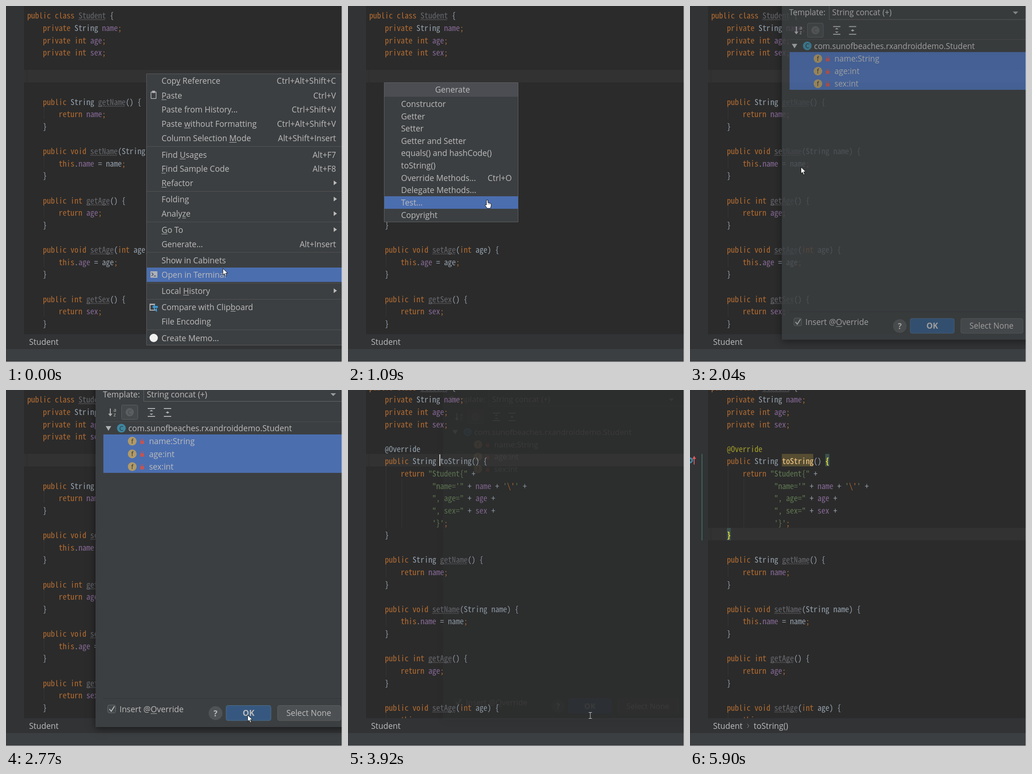
Recreate the animation shown at these times as an HTML page with a canvas. Size 728 by 769 pixels, loop 6280 ms.

```html
<!DOCTYPE html>
<html lang="en">
<head>
<meta charset="utf-8">
<title>Generating toString()</title>
<style>
html, body { margin: 0; width: 100%; height: 100%; overflow: hidden; background: #2b2b2b; }
canvas { display: block; }
</style>
</head>
<body>
<canvas id="stage" width="728" height="769"></canvas>
<script>
const W = 728, H = 769, LOOP = 6280;
const stage = document.getElementById('stage').getContext('2d');
const buffer = Object.assign(document.createElement('canvas'), { width: W, height: H }).getContext('2d');
let g = stage;

const UI = '17.5px "Open Sans", "Noto Sans", sans-serif';
const MONO = '"Noto Sans Mono CJK SC", "Noto Sans Mono CJK JP", "Liberation Mono", monospace';
const PANEL = '#3c3f41', TEXT = '#bbbbbb', SELECT = '#4b6eaf';
const COL = 8.53, ROW = 26.62, TOP = 5, LEFT = 46;

// Choose the code size whose advance equals one column.
g.font = '100px ' + MONO;
const CODE = (100 * COL / g.measureText('0').width).toFixed(2) + 'px ' + MONO;

// ---------- drawing helpers ----------
function box(x, y, w, h, fill, stroke, r = 0) {
  g.beginPath();
  g.roundRect(x, y, w, h, r);
  if (fill) { g.fillStyle = fill; g.fill(); }
  if (stroke) { g.strokeStyle = stroke; g.lineWidth = 1; g.stroke(); }
}

function poly(points, fill, stroke, width = 1) {
  g.beginPath();
  points.forEach(([x, y]) => g.lineTo(x, y));
  if (fill) { g.closePath(); g.fillStyle = fill; g.fill(); }
  if (stroke) { g.strokeStyle = stroke; g.lineWidth = width; g.stroke(); }
}

function disc(x, y, r, fill) {
  g.beginPath();
  g.arc(x, y, r, 0, 7);
  g.fillStyle = fill;
  g.fill();
}

function text(s, x, y, { color = TEXT, align = 'left', font = UI } = {}) {
  g.font = font;
  g.fillStyle = color;
  g.textAlign = align;
  g.fillText(s, x, y);
}

// "&" marks the underlined letter.
function label(s, x, mid) {
  const at = s.indexOf('&'), plain = s.replace('&', '');
  text(plain, x, mid + 6.5);
  if (at < 0) return;
  const start = x + g.measureText(plain.slice(0, at)).width;
  box(start, mid + 9, g.measureText(plain[at]).width, 1, TEXT);
}

// Draws a group at once with opacity and scale about the dialog's centre.
function layer(draw, alpha = 1, scale = 1) {
  if (alpha === 1) return draw();
  buffer.clearRect(0, 0, W, H);
  g = buffer;
  g.save();
  g.translate(488, 300);
  g.scale(scale, scale);
  g.translate(-488, -300);
  draw();
  g.restore();
  g = stage;
  g.globalAlpha = alpha;
  g.drawImage(buffer.canvas, 0, 0);
  g.globalAlpha = 1;
}

// ---------- editor ----------
// "_" marks a field, "~" an unused symbol.
const accessors = (name, type, setter = true) => {
  const cap = name[0].toUpperCase() + name.slice(1);
  const out = ['', `    public ${type} ~get${cap}() {`, `        return _${name};`, '    }'];
  if (setter) out.push('', `    public void ~set${cap}(${type} ${name}) {`, `        this._${name} = ${name};`, '    }');
  return out;
};
const fields = ['public class ~Student {', '    private String _name;', '    private int _age;', '    private int _sex;'];
const methods = [...accessors('name', 'String'), ...accessors('age', 'int'), ...accessors('sex', 'int', false)];
const before = [...fields, '', '', ...methods];
const pad = ' '.repeat(16);
const after = [...fields, '', '    @Override', '    public String toString() {',
  '        return "Student{" +',
  pad + `"name='" + _name + '\\'' +`,
  pad + '", age=" + _age +',
  pad + '", sex=" + _sex +',
  pad + `'}';`, '    }', ...methods];

const TOKEN = /(\b(?:public|class|private|int|void|return|this)\b|;|\\')|_(\w+)|~(\w+)|("[^"]*"|'}'|')|(@\w+)|([^\s\w]|\w+)|\s+/g;

const rowY = row => TOP + row * ROW;
const baseline = row => Math.round(rowY(row) + 22.3);

// Slight transparency keeps the strokes as light as a thin screen font.
function code(s, col, row, color, weight = '') {
  g.globalAlpha = 0.85;
  text(s, LEFT + col * COL, baseline(row), { color, font: weight + CODE });
  g.globalAlpha = 1;
}

function wave(x, y, w) {
  const pts = [];
  for (let i = 0; i <= w; i += 2) pts.push([x + i, y + (i % 4 ? 0 : 2)]);
  poly(pts, null, '#72737a', 0.9);
}

function codeLine(line, row, lit) {
  let col = 0;
  for (const [all, key, field, unused, str, note, plain] of line.matchAll(TOKEN)) {
    const word = key || field || unused || str || note || plain;
    const color = key ? '#cc7832' : field ? '#9876aa' : unused ? '#72737a' : str ? '#6a8759'
      : note && lit ? '#bbb529' : '#a9b7c6';
    if (word) code(word, col, row, color);
    if (unused) wave(LEFT + col * COL, baseline(row) + 1.5, word.length * COL);
    col += (word || all).length;
  }
}

function editor({ lines, first, caretRow, lit, done, marked, caret }) {
  box(0, 0, W, H, '#2b2b2b');
  box(0, 0, 39, H, '#313335');
  g.save();
  g.beginPath();
  g.rect(0, 0, W, 709);
  g.clip();
  box(39, rowY(caretRow), W - 39, ROW + 0.4, '#323232');
  box(45, rowY(caretRow), 1, ROW, '#2b2b2b');
  lines.forEach((line, i) => {
    if (line.startsWith('        ')) box(82, rowY(i - first), 1, ROW, '#363636');
    if (line.startsWith(pad)) box(116, rowY(i - first), 1, ROW, '#363636');
  });
  if (marked) box(199, 138, 68, 27, '#564d32');
  if (done) {
    box(293, 138, 9, 27, '#3b514d');
    box(80, 298, 8.5, 27, '#3b514d');
    box(25, 138, 2, 187, '#42645a');
  }
  lines.forEach((line, i) => codeLine(line, i - first, lit));
  if (marked) code('toString', 18, 5, '#ffc66d');
  if (done) {
    code('{', 29, 5, '#ffef28', 'bold ');
    code('}', 4, 11, '#ffef28', 'bold ');
  }
  if (lit) {
    disc(0, 152, 6.5, '#3e86a0');
    disc(0, 152, 2.8, '#313335');
    poly([[9, 161], [9, 144]], null, '#db5860', 2);
    poly([[5, 149], [9, 142], [13, 149]], '#db5860');
  }
  if (caret) box(caret[0], rowY(caret[1]) + 1, 2, 25, '#d0d0d0');
  g.restore();

  box(0, 709, W, 32, '#313335');
  box(0, 741, W, 28, PANEL);
  text('Student', 50, 732);
  if (lit) {
    poly([[124, 721], [127.5, 725.5], [124, 730]], null, '#777777', 1.2);
    text('toString()', 138, 732);
  }
}

function edges() {
  box(W - 1, 0, 1, H, 'rgba(255,255,255,.6)');
  box(0, H - 1, W, 1, 'rgba(255,255,255,.6)');
}

// ---------- context menu ----------
const MENU = [
  [161, 'Cop&y Reference', 'Ctrl+Alt+Shift+C'], [193, '&Paste', 'Ctrl+V'],
  [223.5, 'Paste from History...', 'Ctrl+Shift+V'], [254, 'Paste &without Formatting', 'Ctrl+Alt+Shift+V'],
  [285, 'Column Selection &Mode', 'Alt+Shift+Insert'], [303],
  [321, 'Find &Usages', 'Alt+F7'], [351.5, '&Find Sample Code', 'Alt+F8'], [382, '&Refactor', '>'], [400],
  [417, 'Folding', '>'], [448.5, 'Analy&ze', '>'], [466],
  [483, '&Go To', '>'], [514, 'Generate...', 'Alt+Insert'], [531.5],
  [549, 'Show in Cabinets'], [580.5, 'Open in Terminal'], [598],
  [615, 'Local &History', '>'], [633],
  [650, 'Compare with Clip&board'], [681, 'File Encoding'], [699],
  [717, 'Create Memo...']
];

function menuIcons() {
  box(314, 185.5, 11.5, 14.5, null, '#afb1b3');
  box(314.5, 186, 10.5, 13.5, null, '#afb1b3');
  box(316.5, 183, 6.5, 5, '#afb1b3');

  box(313, 573, 15, 14, '#afb1b3');
  poly([[315.5, 576], [319, 579.5], [315.5, 583]], null, '#3c4f70', 1.6);
  box(320, 582.5, 5, 1.5, '#3c4f70');

  box(311, 643, 12, 15, '#afb1b3');
  box(313, 646, 8, 10, PANEL);
  poly([[317, 650], [323, 644], [323, 648], [329, 648], [329, 652], [323, 652], [323, 656]], '#3d9ad1');
  poly([[322, 657], [327, 652], [327, 661]], '#3d9ad1');

  disc(320, 717, 9, '#f0f0f0');
}

function menu(selected) {
  box(304.5, 146.5, 424, 586, PANEL, '#5a5d5f');
  for (const [y, name, keys] of MENU) {
    if (!name) { box(305, y, W - 305, 1, '#515355'); continue; }
    if (y === selected) box(305, y - 15.5, W - 305, 31, SELECT);
    label(name, 337, y);
    if (keys === '>') poly([[710, y - 5], [717, y], [710, y + 5]], TEXT);
    else if (keys) text(keys, 715, y + 6.5, { align: 'right' });
  }
  menuIcons();
}

// ---------- generate popup ----------
const ACTIONS = ['Constructor', 'Getter', 'Setter', 'Getter and Setter', 'equals() and hashCode()',
  'toString()', 'Override Methods...', 'Delegate Methods...', 'Test...', 'Copyright'];

function popup(selected) {
  box(78.5, 165.5, 290, 301, PANEL, '#5f6163');
  box(79, 166, 289, 30, '#4b4d52');
  text('Generate', 226.5, 186.5, { align: 'center' });
  ACTIONS.forEach((name, i) => {
    const y = 198 + i * ROW;
    if (i === selected) box(79, y, 289.5, 27, SELECT);
    text(name, 115, y + 20);
    if (i === 6) text('Ctrl+O', 355, y + 20, { align: 'right' });
  });
}

// ---------- toString dialog ----------
function foldIcon(x, dir) {
  box(x - 8, 39, 16, 2, '#afb1b3');
  box(x - 8, 56, 16, 2, '#afb1b3');
  poly([[x - 4, 47 - dir], [x, 47 - 4 * dir], [x + 4, 47 - dir]], '#afb1b3');
  poly([[x - 4, 50 + dir], [x, 50 + 4 * dir], [x + 4, 50 + dir]], '#afb1b3');
}

function badge(x, y, letter, fill) {
  disc(x, y, 9.5, fill);
  text(letter, x, y + 5, { color: '#303335', align: 'center', font: '14px "Open Sans", sans-serif' });
}

function dialog(selection) {
  g.save();
  g.shadowColor = 'rgba(0,0,0,.5)';
  g.shadowBlur = 16;
  g.shadowOffsetY = 4;
  box(194, -60, 600, 788, PANEL);
  g.restore();

  text('Template:', 210, 15.5);
  box(298.5, -20, 460, 44.5, PANEL, '#646668');
  text('String concat (+)', 305, 15.5);
  poly([[703, 7], [715, 7], [709, 13]], '#9a9da0');

  poly([[226, 40], [226, 54]], null, '#afb1b3', 2);
  poly([[221.5, 51], [226, 57], [230.5, 51]], '#afb1b3');
  const tiny = '11px "Open Sans", sans-serif';
  text('a', 233, 47, { font: tiny });
  text('z', 233, 57, { font: tiny });
  box(250.5, 32.5, 35, 31, '#45484a', '#5e6163', 3);
  disc(268, 48, 9, '#5b5e60');
  text('C', 268, 53, { color: '#45484a', align: 'center', font: '13px "Open Sans", sans-serif' });
  foldIcon(315, 1);
  foldIcon(350, -1);

  box(211, 68, W, 1, '#4b4d4f');
  box(211, 666, W, 1, '#333638');
  poly([[216, 78], [228, 78], [222, 88]], '#afb1b3');
  badge(250, 82.5, 'C', '#3e86a0');
  text('com.sunofbeaches.rxandroiddemo.Student', 265, 89);
  box(211, 96, W, 83, selection);
  ['name:String', 'age:int', 'sex:int'].forEach((s, i) => {
    const y = 110.5 + i * 27.5;
    badge(273.5, y, 'f', '#b09a68');
    box(291, y - 1, 8, 7, '#c75450');
    box(292.5, y - 5, 5, 6, null, '#c75450', 2);
    text(s, 310, y + 6.5);
  });

  box(220.5, 680.5, 17, 17, '#43494a', '#6b6e70', 3);
  poly([[224, 689], [228, 694], [235, 683]], null, TEXT, 2);
  label('Insert @&Override', 246, 689.5);
  disc(454, 698, 15, '#4f5355');
  text('?', 454, 704.5, { align: 'center', font: 'bold ' + UI });
  box(477, 681.5, 97, 32.5, '#365880', '#4c708c', 4);
  text('OK', 525.5, 704, { align: 'center', font: 'bold ' + UI });
  box(588.5, 681.5, 137, 32.5, '#4c5052', '#5e6060', 4);
  text('Select None', 656, 704, { align: 'center' });
}

// ---------- pointers ----------
const at = (x, y, pts) => pts.map(([a, b]) => [x + a, y + b]);

const pointers = {
  arrow(x, y) {
    const pts = at(x, y, [[0, 0], [0, 14], [3.3, 11], [5.6, 16.5], [8, 15.5], [5.8, 10.2], [10.3, 10], [0, 0]]);
    poly(pts, '#ffffff', '#000000', 0.9);
  },
  beam(x, y) {
    box(x - 0.5, y - 6, 1, 12, '#d0d0d0');
    for (const dy of [-7, 6]) box(x - 3.5, y + dy, 7, 1, '#d0d0d0');
  },
  hand(x, y) {
    const pts = at(x, y, [[-1.5, 0], [1.5, 0], [1.8, 6], [8, 7.5], [9, 9], [8.5, 13], [7, 18], [0, 18], [-4.5, 11.5], [-4, 9.5], [-1.5, 11], [-1.5, 0]]);
    poly(pts, '#ffffff', '#000000', 0.9);
    for (const dx of [2, 4.5, 7]) box(x + dx, y + 7.5, 0.7, 3, '#555555');
  }
};

// ---------- timeline ----------
const OLD = { lines: before, first: 0, caretRow: 5 };
const NEW = { lines: after, first: 1, caretRow: 5, caret: [198, 5] };
const LIT = { ...NEW, lit: true };
const CLICKED = { ...LIT, caretRow: 11, caret: [88, 11], done: true };
const MARKED = { ...CLICKED, marked: true };

const showMenu = (y, alpha) => () => layer(() => menu(y), alpha);
const showPopup = i => () => popup(i);
const showDialog = (alpha, scale, selection = SELECT) => () => layer(() => dialog(selection), alpha, scale);

// start, editor state, window above it, pointer, x, y
const steps = [
  [0, OLD, showMenu(580.5), 'arrow', 470, 567],
  [150, OLD, showMenu(549), 'arrow', 449, 541],
  [270, OLD, showMenu(514), 'arrow', 421, 509],
  [420, OLD, showMenu(514, 0.4), 'arrow', 421, 509],
  [540, OLD, null, 'beam', 421, 513],
  [660, OLD, showPopup(0), 'beam', 388, 501],
  [970, OLD, showPopup(9), 'hand', 340, 447],
  [1090, OLD, showPopup(8), 'hand', 301.5, 419],
  [1240, OLD, showPopup(7), 'hand', 281, 394],
  [1370, OLD, showPopup(6), 'hand', 261, 369],
  [1490, OLD, showPopup(5), 'hand', 245.5, 349],
  [1640, OLD, showPopup(5), 'hand', 242, 348],
  [1890, OLD, showPopup(5), 'hand', 242, 343],
  [2040, OLD, showDialog(0.8, 0.983), 'arrow', 240.5, 348],
  [2190, OLD, showDialog(), 'arrow', 300.5, 382],
  [2350, OLD, showDialog(), 'arrow', 493.5, 593],
  [2490, OLD, showDialog(), 'arrow', 539, 672],
  [2620, OLD, showDialog(), 'arrow', 534, 703],
  [2770, OLD, showDialog(), 'arrow', 523.5, 702],
  [3800, OLD, showDialog(0.5, 0.975), 'arrow', 523.5, 702],
  [3920, NEW, showDialog(0.1, 0.962, PANEL), 'beam', 525, 703],
  [4070, NEW, null, 'beam', 518, 688],
  [4190, LIT, null, 'beam', 475, 596],
  [4340, LIT, null, 'beam', 372, 384],
  [4460, LIT, null, 'beam', 313, 265],
  [4770, LIT, null, 'beam', 226, 311],
  [4890, LIT, null, 'beam', 59, 126],
  [5040, CLICKED, null, 'beam', 314, 311],
  [5290, MARKED, null, 'beam', 446, 414],
  [5440, MARKED, null, 'beam', 638, 687],
  [5600, MARKED, null, 'arrow', 650, 721],
  [5750, MARKED, null, 'arrow', 712, 752],
  [5900, { ...MARKED, caret: null }, null]
];

const origin = performance.now();
let shown = null;

function tick() {
  const t = (performance.now() - origin) % LOOP;
  const step = steps.findLast(s => s[0] <= t);
  if (step !== shown) {
    const [, state, overlay, pointer, x, y] = shown = step;
    editor(state);
    if (overlay) overlay();
    if (pointer) pointers[pointer](x, y);
    edges();
  }
  requestAnimationFrame(tick);
}
tick();
</script>
</body>
</html>
```
